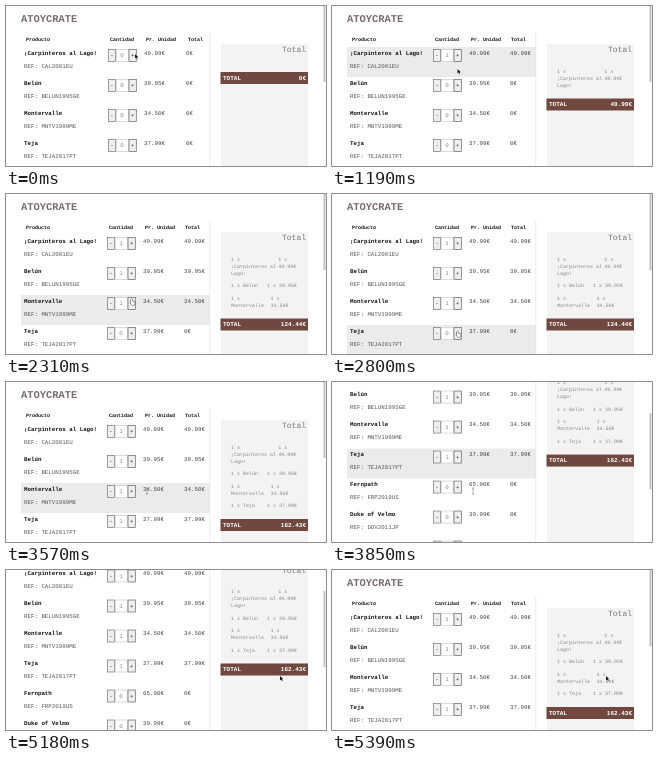
Animation, 320 px wide and 160 px high, one loop 5.67 s. Source, as an HTML page with a canvas:

```html
<!DOCTYPE html>
<html lang="es">
<head>
<meta charset="utf-8">
<title>Tienda</title>
<style>
  html, body { margin: 0; width: 100%; height: 100%; overflow: hidden; background: #fff; }
  canvas { display: block; }
</style>
</head>
<body>
<canvas id="stage" width="320" height="160"></canvas>
<script>
const ctx = document.getElementById('stage').getContext('2d');
ctx.textRendering = 'geometricPrecision';

const LOOP = 5670, STEP = 70, ROW_TOP = 41, ROW_H = 30, PAGE_H = 331, MAX_SCROLL = 87;

// bought: time the plus button is clicked
const games = [
  { name: '¡Carpinteros al Lago!', ref: 'CAL2001EU', price: 49.99, bought: 700 },
  { name: 'Belún', ref: 'BELUN1995GE', price: 39.95, bought: 1540 },
  { name: 'Montervalle', ref: 'MNTV1999ME', price: 34.5, bought: 2240 },
  { name: 'Teja', ref: 'TEJA2017PT', price: 37.99, bought: 2870 },
  { name: 'Fernpath', ref: 'FRP2019US', price: 65 },
  { name: 'Duke of Velmo', ref: 'DOV2011JP', price: 39.99 },
  { name: 'Ramen Up!', ref: 'RMU2013JP', price: 12.99 }
];

// Pointer moves after its start at 129, 48
const moves = [
  { from: 210, to: 350, x: 126, y: 48 },
  { from: 1050, to: 1330, x: 125, y: 78 },
  { from: 1610, to: 1820, x: 125, y: 105 },
  { from: 2380, to: 2730, x: 125, y: 137 },
  { from: 2940, to: 3360, x: 128, y: 109 },
  { from: 3430, to: 3570, x: 141, y: 109 },
  { from: 4410, to: 4620, x: 185, y: 35 },
  { from: 4620, to: 4900, x: 274, y: 106 }
];

function ease(t, from, to) {
  const p = Math.min(1, Math.max(0, (t - from) / (to - from)));
  return p * p * (3 - 2 * p);
}

const scrollAt = t => MAX_SCROLL * (ease(t, 3710, 3920) - ease(t, 4970, 5390));

function pointerAt(t) {
  let x = 129, y = 48;
  for (const m of moves) {
    const p = ease(t, m.from, m.to);
    x += (m.x - x) * p;
    y += (m.y - y) * p;
  }
  return { x, y };
}

// The highlight trails the pointer by one step
function hoveredRow(t) {
  const { x, y } = pointerAt(t - STEP);
  if (t < 700 || x > 204) return -1;
  return Math.floor((y + scrollAt(t - STEP) - ROW_TOP) / ROW_H);
}

function text(s, x, y, size, color, weight = 400, align = 'left') {
  ctx.font = `${weight} ${size}px "Liberation Mono", "Courier New", monospace`;
  ctx.textAlign = align;
  ctx.fillStyle = color;
  ctx.fillText(s, x, y + size * 0.3);
}

function box(x, y, w, h, fill, stroke) {
  ctx.fillStyle = fill;
  ctx.fillRect(x, y, w, h);
  if (!stroke) return;
  ctx.strokeStyle = stroke;
  ctx.lineWidth = 0.7;
  ctx.strokeRect(x, y, w, h);
}

const euros = n => (n ? n.toFixed(2) : '0') + '€';

function drawTable(t) {
  const hover = hoveredRow(t);
  const shift = t < 700 ? 1 : 0; // narrow totals leave the columns further right
  const head = (s, x) => text(s, x, 33, 5, '#111', 700);
  head('Producto', 20);
  head('Cantidad', 103 + shift);
  head('Pr. Unidad', 139 + shift);
  head('Total', 179 + shift * 3);
  games.forEach((g, i) => {
    const y = ROW_TOP + i * ROW_H;
    const qty = t >= g.bought ? 1 : 0;
    const bx = 101.5 + shift;
    if (i === hover) box(15, y, 189, ROW_H, '#ebebeb');
    text(g.name, 18, y + 6, 5.8, '#111', 700);
    text('REF: ' + g.ref, 18, y + 19, 5.8, '#555');
    box(bx, y + 2.5, 7, 12, '#efefef', '#777');
    box(bx + 7.8, y + 2.5, 12, 12, '#fff', '#ccc');
    box(bx + 20.5, y + 2.5, 7.3, 12, '#efefef', '#666');
    text('-', bx + 3.5, y + 8.5, 5.5, '#222', 400, 'center');
    text(qty, bx + 13.5, y + 8.5, 5.8, '#888', 400, 'center');
    text('+', bx + 24.1, y + 8.5, 5.5, '#222', 400, 'center');
    text(euros(g.price), 137 + shift, y + 6, 5.8, '#444');
    text(euros(g.price * qty), 178 + shift * 2, y + 6, 5.8, '#444');
  });
  box(203.5, 26, 0.7, PAGE_H, '#e4e4e4');
}

function wrap(s, max) {
  return s.split(' ').reduce((lines, word) => {
    const joined = lines.length ? lines[lines.length - 1] + ' ' + word : word;
    if (lines.length && joined.length <= max) lines[lines.length - 1] = joined;
    else lines.push(word);
    return lines;
  }, []);
}

// Two cells share a line of 22 characters and shrink in proportion when too long
function drawCartItem(game, y) {
  const cells = ['1 x ' + game.name, '1 x ' + euros(game.price)];
  const total = cells[0].length + cells[1].length;
  const fit = Math.min(1, 22 / total);
  const [left, right] = cells.map(s => wrap(s, s.length * fit));
  const rightX = 291 - cells[1].length * fit * 3;
  left.forEach((s, i) => text(s, 225, y + i * 7, 5, '#888'));
  right.forEach((s, i) => text(s, rightX, y + i * 7, 5, '#888'));
  return y + left.length * 7 + 5.5;
}

function drawCart(t) {
  const bought = games.filter(g => t >= g.bought);
  const sum = bought.reduce((n, g) => n + g.price, 0);
  box(215, 38, 87, PAGE_H, '#f3f3f3');
  text('Total', 300, 44, 8, '#777', 400, 'right');
  const y = bought.reduce((top, g) => drawCartItem(g, top), 65);
  box(214.5, y + 1, 87.5, 12, '#70483f');
  text('TOTAL', 217, y + 7, 6, '#fff', 700);
  text(euros(sum), 300, y + 7, 6, '#fff', 700, 'right');
}

const shapes = {
  arrow: new Path2D('M0 0V4.6L1.2 3.6L2 5.2L2.7 4.9L2 3.3H3.4Z'),
  hand: new Path2D('M0 0.5Q.6-.3 1.2.5V2.2L3.6 2.8V4.6L3 6H.8L-1 3.6L-.4 3.2L0 3.6Z'),
  beam: new Path2D('M-1.2-3H1.2M0-3V3M-1.2 3H1.2')
};

function drawPointer({ x, y }, scroll) {
  const inRow = (y + scroll - ROW_TOP) % ROW_H;
  const onButton = x > 121 && x < 129 && inRow > 2 && inRow < 15;
  const onPrice = x > 136 && x < 160 && inRow < 14;
  const paint = (shape, fill, stroke, width) => {
    ctx.lineWidth = width;
    ctx.strokeStyle = stroke;
    ctx.stroke(shape);
    ctx.fillStyle = fill;
    ctx.fill(shape);
  };
  ctx.save();
  ctx.translate(x, y);
  if (onButton) paint(shapes.hand, '#fff', '#111', 0.8);
  else if (onPrice) paint(shapes.beam, 'transparent', '#666', 0.5);
  else paint(shapes.arrow, '#111', '#fff', 0.6);
  ctx.restore();
}

function frame(now) {
  const t = Math.floor((now % LOOP) / STEP) * STEP;
  const scroll = scrollAt(t);
  box(0, 0, 320, 160, '#fff');
  ctx.save();
  ctx.translate(0, -scroll);
  text('ATOYCRATE', 15, 13, 10.4, '#796b6b', 700);
  drawTable(t);
  drawCart(t);
  ctx.restore();
  box(317.5, scroll * 160 / PAGE_H, 2, 76, '#c1c1c1');
  drawPointer(pointerAt(t), scroll);
  requestAnimationFrame(frame);
}
requestAnimationFrame(frame);
</script>
</body>
</html>
```
